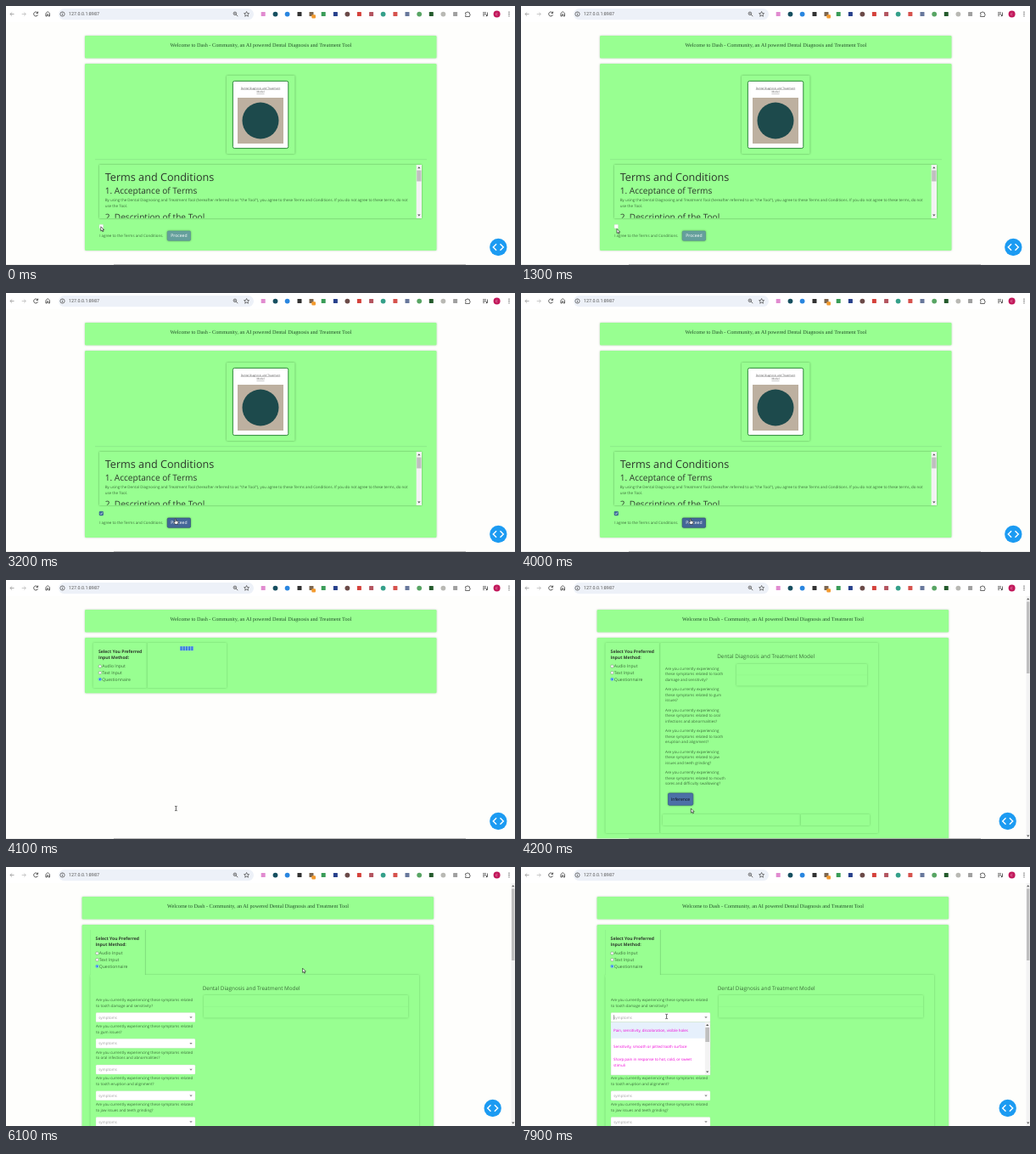
Recreate the animation shown at these times as an HTML page. Size 600x305 px, loop 8000 ms.

```html
<!DOCTYPE html>
<html lang="en">
<head>
<meta charset="utf-8">
<title>Dental questionnaire</title>
<style>
html, body { margin: 0; width: 100%; height: 100%; overflow: hidden; background: #fefefc; }
svg { display: block; width: 600px; height: 305px; }
text { font-family: "Open Sans", sans-serif; fill: #2b372b; text-rendering: geometricPrecision; white-space: pre; }
.serif { font-family: "Liberation Serif", "Times New Roman", serif; fill: #23502a; }
.url { font-family: Roboto, sans-serif; fill: #555; }
.bold { font-weight: 700; }
.mid { text-anchor: middle; }
.soft { fill: #2d5a2d; fill-opacity: .88; }
.link { fill: #555; text-decoration: underline; }
.white { fill: #fff; }
.hint { fill: #a0a0a0; }
.option { fill: #f000d8; }
.dark { fill: #0a0a14; }
.card { filter: drop-shadow(0 .8px 1.2px rgba(0, 60, 0, .26)); }
.lift { filter: drop-shadow(.4px .8px 1.3px rgba(0, 40, 0, .4)); }
</style>
</head>
<body>
<svg id="stage" viewBox="0 0 600 305" xmlns="http://www.w3.org/2000/svg"></svg>
<script>
const LOOP = 8000, STEP = 100;
const CHECKED = 2000, LOADING = 4100, NARROW = 4200, WIDE = 4300, OPENED = 7400;
const GREEN = '#98ff91', INK = '#444';
const stage = document.getElementById('stage');
let layer = stage;

function add(tag, attrs, label) {
  const el = document.createElementNS(stage.namespaceURI, tag);
  for (const k in attrs) el.setAttribute(k, attrs[k]);
  if (label !== undefined) el.textContent = label;
  layer.appendChild(el);
  return el;
}

function group(draw, attrs = {}) {
  const parent = layer;
  const g = add('g', attrs);
  layer = g;
  draw();
  layer = parent;
  return g;
}

// Boxes are given by their corners, text by its optical middle line.
const box = (x1, y1, x2, y2, fill, more) =>
  add('rect', { x: x1, y: y1, width: x2 - x1, height: y2 - y1, fill, ...more });
const dot = (cx, cy, r, fill, more) => add('circle', { cx, cy, r, fill, ...more });
const line = (d, stroke, width, more) =>
  add('path', { d, stroke, 'stroke-width': width, fill: 'none', ...more });
const shape = (d, fill, more) => add('path', { d, fill, ...more });
const text = (x, y, size, label, cls = '') =>
  add('text', { x, y: y + size * 0.35, 'font-size': size, class: cls }, label);
const card = (x1, y1, x2, y2) => box(x1, y1, x2, y2, GREEN, { rx: 1, class: 'card' });
const arrow = (x, y, dir, fill = '#555') =>
  shape(`M${x - 1.7} ${y - dir * 0.9}h3.4l-1.7 ${dir * 1.9}z`, fill);

function toolbar() {
  box(0, 0, 600, 19, '#fff');
  box(62, 3, 292, 16.3, '#edf1f8', { rx: 6.6 });
  line('M9.5 9.5H5M7 7.4L4.9 9.5L7 11.6', '#999', 0.8);
  line('M18.7 9.5h4.5M21.2 7.4l2.1 2.1l-2.1 2.1', '#bbb', 0.8);
  line('M37.2 8a2.5 2.5 0 1 0 .3 2.4M37.6 6.6v1.9h-1.9', INK, 0.9);
  line('M46.9 12V8.6L49.2 6.6L51.5 8.6V12H50V9.9H48.4V12z', INK, 0.8);
  dot(66.5, 9.5, 2.6, 'none', { stroke: INK, 'stroke-width': 0.7 });
  line('M66.5 9.1v2M66.5 7.6v.8', INK, 0.7);
  text(74, 9.6, 5.42, '127.0.0.1:8987', 'url');
  dot(269.9, 8.8, 1.8, 'none', { stroke: INK, 'stroke-width': 0.7 });
  line('M271.3 10.2l2 2M269 8.8h1.8', INK, 0.8);
  line('M283.6 6.5l.9 2l2.1.2l-1.6 1.4l.5 2.1l-1.9-1.1l-1.9 1.1l.5-2.1l-1.6-1.4l2.1-.2z', INK, 0.7);

  // Toolbar buttons as plain marks: x, colour, square or round
  [[303.2, '#e18bd0', 1], [317.5, '#164f60', 0], [331.6, '#2a86e0', 0], [346, '#333', 1],
   [360, '#7c6650', 1], [374.2, '#3a9c58', 1], [388.4, '#27408c', 1], [402.4, '#6b4a48', 0],
   [416.4, '#d5423c', 1], [430.6, '#b45560', 1], [444.6, '#35a08a', 0], [458.9, '#d6524d', 1],
   [473, '#68789c', 1], [487.2, '#58a564', 0], [501.3, '#245a2c', 1], [515.4, '#b9b9b4', 0],
   [529.6, '#a0a0a0', 1]].forEach(([x, fill, square]) => square
    ? box(x - 2.5, 7, x + 2.5, 12, fill, { rx: 0.6 })
    : dot(x, 9.6, 2.9, fill));
  box(360.3, 10.2, 365, 14.6, '#f39a2d', { rx: 1 });
  line('M541.6 7.8h1.6a.9.9 0 0 1 1.9 0h1.3v1.7a.9.9 0 0 1 0 1.8v1.2h-4.8v-1.3a.9.9 0 0 0 0-1.7z', INK, 0.8);
  line('M562 7.7h4M562 9.5h4M562 11.3h2.2M567.5 7.5v3.6', INK, 0.8);
  dot(566.7, 11.2, 1, INK);
  dot(578.6, 9.5, 4, '#c2185b');
  text(578.6, 9.5, 4, 'C', 'mid white');
  [7.2, 9.5, 11.8].forEach(y => dot(593, y, 0.65, INK));
}

function header(dx) {
  box(93 + dx, 35, 507.5 + dx, 61.5, GREEN, { rx: 1.2, class: 'card' });
  text(300.5 + dx, 45.4, 6.25,
    'Welcome to Dash - Community, an AI powered Dental Diagnosis and Treatment Tool', 'serif mid');
}

function debugButton(x) {
  dot(x, 284, 10.2, '#1c9bf2');
  line(`M${x - 2.2} 280.2l-3.8 3.8l3.8 3.8M${x + 2.2} 280.2l3.8 3.8l-3.8 3.8`, '#fff', 1.4);
}

function bottomEdge() {
  box(0, 304.4, 600, 305, '#e2e2e0');
  line('M127 304.6H542', '#999', 0.7);
}

function scrollbar(x1, y1, x2, y2, from, to) {
  const mid = (x1 + x2) / 2;
  box(x1, y1, x2, y2, '#f3f3f3');
  box(x1 + 0.5, from, x2 - 0.5, to, '#bfbfbf');
  arrow(mid, y1 + 3.3, -1);
  arrow(mid, y2 - 3.5, 1);
}

function methods(x) {
  text(x, 84.2, 5.08, 'Select You Preferred', 'bold');
  text(x, 91.7, 5.08, 'Input Method:', 'bold');
  ['Audio Input', 'Text Input', 'Questionnaire'].forEach((name, i) => {
    const y = 101.6 + i * 7.65, on = i === 2;
    dot(x + 1.8, y, 1.7, '#fff', { stroke: on ? '#1672e8' : '#777', 'stroke-width': 0.5 });
    if (on) dot(x + 1.8, y, 1.1, '#1672e8');
    text(x + 4.2, y, 5.08, name, 'soft');
  });
}

function termsPage() {
  header(0);
  box(93, 68, 507.5, 288, GREEN, { rx: 1.2, class: 'card' });
  box(260, 82, 340.5, 174, GREEN, { rx: 1, class: 'lift' });
  box(267.4, 88.4, 332.8, 167.6, '#fff', { rx: 2, stroke: '#1f7a2c', 'stroke-width': 0.9 });
  text(300, 96.6, 3.12, 'Dental Diagnosis and Treatment', 'mid link');
  text(300, 101.4, 3.12, 'Model', 'mid link');
  box(273, 108, 327, 162, '#bdb0a0');
  dot(300, 135, 21.5, '#1d4a4c');
  box(105, 180.6, 496, 181.1, '#7fd87f');

  box(110, 187, 490, 250, GREEN, { class: 'lift' });
  text(116.7, 201.2, 12.65, 'Terms and Conditions');
  text(116.7, 217.2, 10.12, '1. Acceptance of Terms');
  text(116.7, 228.7, 4.475, 'By using the Dental Diagnosing and Treatment Tool (hereafter referred to as "the Tool"), ' +
    'you agree to these Terms and Conditions. If you do not agree to these terms, do not', 'soft');
  text(116.7, 235.3, 4.475, 'use the Tool.', 'soft');
  group(() => text(116.7, 248.8, 10.12, '2. Description of the Tool'), { 'clip-path': 'url(#terms)' });
  scrollbar(483.7, 187, 490, 250, 193.5, 206.5);

  text(110.2, 270.2, 4.475, 'I agree to the Terms and Conditions.', 'soft');
  bottomEdge();
  debugButton(580.3);
}

function consent(on) {
  box(110, 257.3, 114.6, 261.9, on ? '#3f6f9c' : '#fff',
    { rx: 0.8, stroke: on ? '#2d5580' : '#c9d8c9', 'stroke-width': 0.5 });
  if (on) line('M111 259.7l1 1l1.7-2.1', '#fff', 0.7);
  box(190.2, 265, 217.6, 276.3, on ? '#446698' : '#659f9c',
    { rx: 1.4, class: 'lift', stroke: on ? '#2c4877' : '#5a918e', 'stroke-width': 0.6 });
  text(203.9, 270.6, 5.08, 'Proceed', 'mid white');
}

function loadingPage() {
  header(0);
  box(93, 68, 507.5, 133.3, GREEN, { rx: 1.2, class: 'card' });
  card(102.8, 74, 166, 127);
  card(166.5, 74, 260, 127);
  methods(109);
  box(205, 78, 221, 83.3, '#8fd3d6');
  for (let i = 0; i < 5; i++) box(205.4 + i * 3.2, 78.2, 207.7 + i * 3.2, 83, '#3f7ce0');
  bottomEdge();
  debugButton(580.3);
}

const START = 'Are you currently experiencing';
const TOPICS = ['tooth|damage and sensitivity?', 'gum|issues?', 'oral|infections and abnormalities?',
  'tooth|eruption and alignment?', 'jaw|issues and teeth grinding?',
  'mouth|sores and difficulty swallowing?'].map(s => s.split('|'));

function formBase() {
  header(-3.4);
  box(89.6, 68, 504.1, 312, GREEN, { rx: 1.2, class: 'card' });
}

function resultBox(x1, y1, x2, y2) {
  card(x1, y1, x2, y2);
  box(x1, (y1 + y2) / 2, x2, (y1 + y2) / 2 + 0.4, '#8cf087');
}

function formEnd() {
  scrollbar(595.5, 19, 600, 305, 25.5, 110);
  debugButton(573.7);
}

function narrowForm() {
  formBase();
  card(99.5, 74, 163.6, 298);
  card(164.2, 74, 421, 298);
  methods(105.6);
  text(288.7, 89.8, 6.34, 'Dental Diagnosis and Treatment Model', 'mid soft');
  TOPICS.forEach(([word, rest], i) => {
    const y = 104 + i * 24.5;
    text(170, y, 4.475, START, 'soft');
    text(170, y + 6.6, 4.475, 'these symptoms related to ' + word, 'soft');
    text(170, y + 13.2, 4.475, rest, 'soft');
  });
  resultBox(254, 99, 408, 124.5);
  box(173.3, 251, 202.8, 265.3, '#4c70a6', { rx: 1.8, class: 'lift', stroke: '#34558a', 'stroke-width': 0.6 });
  text(188, 258, 5.08, 'Inference', 'mid dark');
  card(167, 276, 329, 289);
  card(329.6, 276, 411, 289);
  bottomEdge();
  formEnd();
}

function wideForm() {
  formBase();
  card(99.5, 127, 487, 312);
  box(99.5, 74, 164, 130, GREEN);
  box(99.3, 74, 99.7, 127, '#84e384');
  box(163.9, 74, 164.6, 127, '#74cf74');
  methods(105.6);
  text(289.2, 142.4, 6.34, 'Dental Diagnosis and Treatment Model', 'mid soft');
  resultBox(233, 151, 474, 177.5);
  TOPICS.slice(0, 5).forEach(([word, rest], i) => {
    const y = 156.6 + i * 30.75;
    text(106, y, 4.44, START + ' these symptoms related', 'soft');
    text(106, y + 6.8, 4.44, `to ${word} ${rest}`, 'soft');
    box(106, y + 14.9, 223, y + 26, '#fff', { rx: 1.2, stroke: '#cfd8cf', 'stroke-width': 0.3 });
    text(109.2, y + 20.4, 4.44, 'symptoms', 'hint');
    arrow(218, y + 20.6, 1, '#888');
  });
  formEnd();
}

function optionMenu() {
  box(109.1, 174.2, 109.5, 179.8, '#222');
  box(106, 182.5, 223, 245, '#fff', { stroke: '#c4d0c4', 'stroke-width': 0.4 });
  box(106.2, 183, 217, 201.8, '#e6f0fc');
  [[192.2, 'Pain, sensitivity, discoloration, visible holes'],
   [211, 'Sensitivity, smooth or pitted tooth surface'],
   [226.4, 'Sharp pain in response to hot, cold, or sweet'],
   [233, 'stimuli']].forEach(([y, s]) => text(109, y, 4.44, s, 'option'));
  scrollbar(216.8, 182.8, 222.6, 244.8, 189, 206);
}

toolbar();
layer = add('clipPath', { id: 'terms' });
box(110, 187, 483, 249.7, '#000');
layer = stage;

// Each view is shown from its first time up to its second.
const views = [
  [termsPage, 0, LOADING],
  [() => consent(false), 0, CHECKED],
  [() => consent(true), CHECKED, LOADING],
  [loadingPage, LOADING, NARROW],
  [narrowForm, NARROW, WIDE],
  [wideForm, WIDE, LOOP],
  [optionMenu, OPENED, LOOP]
].map(([draw, from, to]) => ({ g: group(draw), from, to }));

const outline = { stroke: '#111', 'stroke-width': 0.6 };
const pointers = {
  arrow: group(() => shape('M0 0V5.2L1.3 4.1L2.1 6L3 5.6L2.2 3.8H3.8Z', '#fff', outline)),
  hand: group(() => shape('M-.6 0q.6-.7 1.2 0V2.3l2.1.5q.6.2.5.9L2.7 6.3H-.5L-2 3.9q.2-.8 1.4 0z', '#fff', outline)),
  beam: group(() => line('M-1.3-2.7Q0-2.7 0-2Q0-2.7 1.3-2.7M0-2V2M-1.3 2.7Q0 2.7 0 2Q0 2.7 1.3 2.7', '#222', 0.7))
};

// Pointer stops: time, x, y
const path = [[0, 111.8, 259.8], [1300, 113, 262.4], [1800, 112.3, 260], [CHECKED, 112.3, 260],
  [2900, 199.8, 266], [4000, 199.8, 266], [LOADING, 200.4, 269], [5000, 199.8, 269],
  [6000, 349.6, 119.2], [6100, 349.6, 119.2], [6500, 216, 153], [6600, 216, 153],
  [7200, 171.6, 176], [LOOP, 171.6, 176]];

function pointerAt(t) {
  const i = path.findIndex(p => p[0] > t);
  const [t0, x0, y0] = path[i - 1], [t1, x1, y1] = path[i];
  const u = (t - t0) / (t1 - t0), e = u * u * (3 - 2 * u);
  return [x0 + (x1 - x0) * e, y0 + (y1 - y0) * e];
}

function kindAt(t, x, y) {
  if (t < LOADING) return x > 190 ? 'hand' : 'arrow';
  if (t < NARROW) return 'beam';
  return t > 6600 && y > 171.5 ? 'beam' : 'arrow';
}

function render(now) {
  const t = Math.floor((now % LOOP) / STEP) * STEP;
  for (const v of views) v.g.style.display = t >= v.from && t < v.to ? '' : 'none';
  const [x, y] = pointerAt(t), kind = kindAt(t, x, y);
  for (const k in pointers) {
    pointers[k].style.display = k === kind ? '' : 'none';
    pointers[k].setAttribute('transform', `translate(${x} ${y})`);
  }
}

const begin = performance.now();
function tick() {
  render(performance.now() - begin);
  requestAnimationFrame(tick);
}
tick();
</script>
</body>
</html>
```
